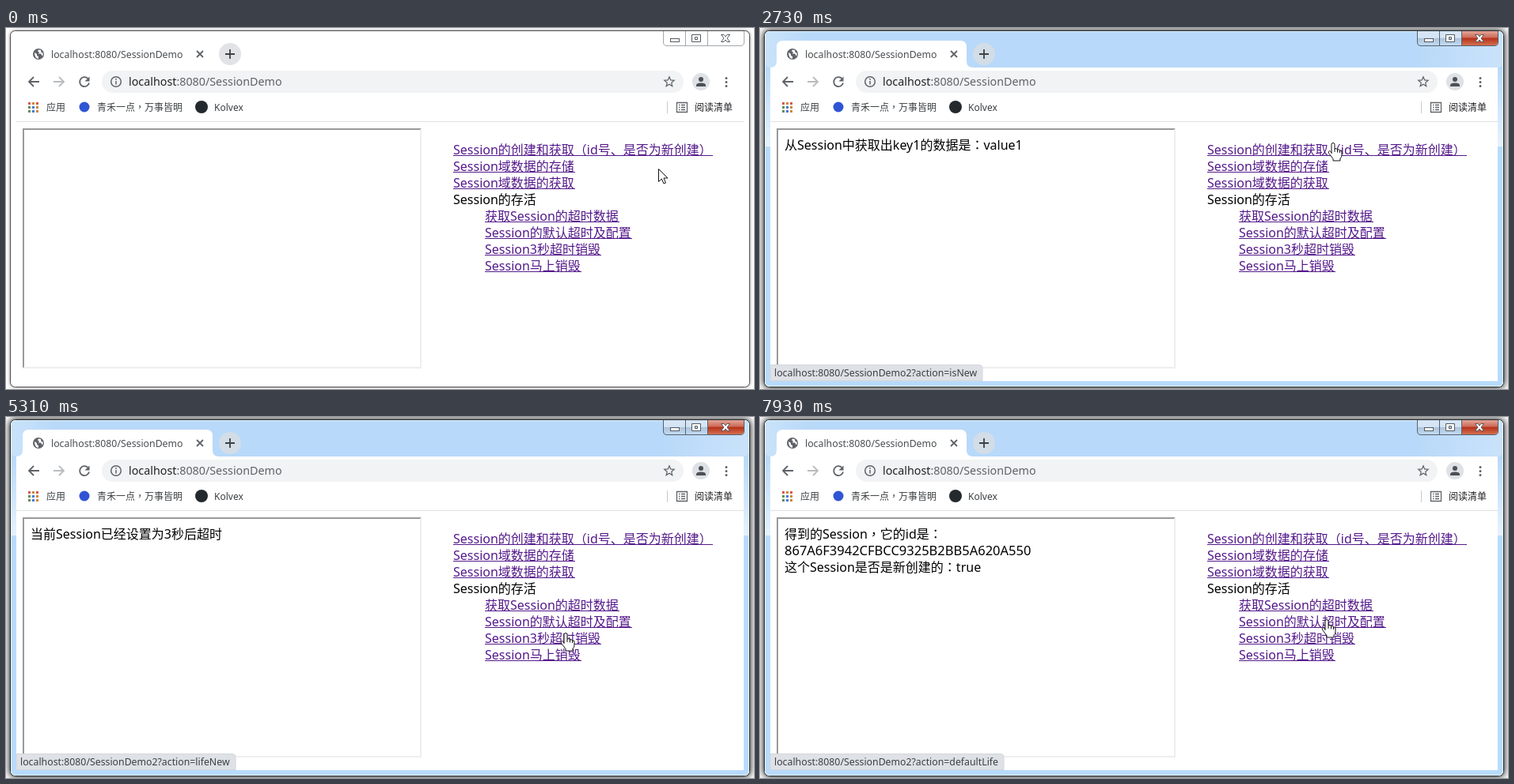
Animation of 945 by 457 pixels, one loop 8000 ms. Source, as an HTML page:

```html
<!DOCTYPE html>
<html lang="zh-CN">
<head>
<meta charset="utf-8">
<title>Session demo</title>
<style>
html, body { margin: 0; width: 100%; height: 100%; overflow: hidden; background: #fff; }
svg { display: block; width: 100%; height: 100%; font: 16px "Noto Sans", "Noto Sans CJK SC", "Noto Sans CJK", sans-serif; }
text { white-space: pre; }
.centred { font-family: "Noto Sans CJK TC", "Noto Sans CJK", sans-serif; }
.small { font-size: 12.300px; fill: #4a4e52; }
#status .small { fill: #3c4043; }
.mark { font-size: 12px; fill: #3c4043; }
.link { fill: #551a8b; }
.link.pressed { fill: #e00; }
.line { fill: none; stroke: #5f6368; stroke-width: 1.8; }
.window { fill: #fff; stroke: #4c4c4c; filter: drop-shadow(0 0 2px #0006); }
.glass, .close { display: none; }
.buttons { fill: #fff; stroke: #a3a7ab; }
.glyph { fill: #fff; stroke: #555b63; }
.plus { fill: #e1e3e6; }
.active .window { stroke: #252a30; filter: drop-shadow(0 0 4px #000b) drop-shadow(0 0 4px #0006); }
.active .glass, .active .close { display: inline; }
.active .buttons { fill: url(#button); stroke: #56626f; }
.active .plus { fill: #d3dde7; }
</style>
</head>
<body>
<svg id="stage" viewBox="0 0 945 457" preserveAspectRatio="none">
  <defs>
    <linearGradient id="side" x2="0" y2="1">
      <stop offset=".1" stop-color="#b8d9f9"/>
      <stop offset=".325" stop-color="#e6f2fe"/>
      <stop offset=".325" stop-color="#b8dbfc"/>
      <stop offset="1" stop-color="#b8dbfc"/>
    </linearGradient>
    <linearGradient id="button" x2="0" y2="1">
      <stop offset=".45" stop-color="#d5e5f5"/>
      <stop offset=".5" stop-color="#adc3da"/>
      <stop offset="1" stop-color="#c2dcf4"/>
    </linearGradient>
    <linearGradient id="red" x2="0" y2="1">
      <stop offset="0" stop-color="#e3a597"/>
      <stop offset=".45" stop-color="#cc6a57"/>
      <stop offset=".5" stop-color="#b5301a"/>
      <stop offset="1" stop-color="#d5704f"/>
    </linearGradient>
    <linearGradient id="shine">
      <stop offset="0" stop-color="#fff" stop-opacity=".25"/>
      <stop offset=".06" stop-color="#fff" stop-opacity="0"/>
      <stop offset=".88" stop-color="#fff" stop-opacity="0"/>
      <stop offset="1" stop-color="#fff" stop-opacity=".25"/>
    </linearGradient>
  </defs>

  <!-- window frame -->
  <rect class="window" x="5.5" y="3.5" width="934" height="451" rx="6"/>
  <rect class="glass" x="6.5" y="4.5" width="932" height="449" rx="5" fill="url(#side)" stroke="#e4f3ff"/>
  <rect class="glass" x="7" y="5" width="931" height="45" rx="5" fill="url(#shine)"/>
  <path class="glass" d="M13 50H932V447H13Z" fill="#fff"/>
  <path class="glass" d="M13 50q8 0 8-8V24q0-8 8-8H253q8 0 8 8V42q0 8 8 8Z" fill="#fff"/>
  <path class="buttons" d="M830.5 4V18q0 4.5 4.5 4.5H928q4.5 0 4.5-4.5V4M858.5 4V22M886.5 4V22"/>
  <path class="close" d="M887 4H932V18q0 4-4 4H887Z" fill="url(#red)"/>
  <g class="glyph">
    <rect x="839.5" y="13.5" width="11" height="4"/>
    <path d="M866.5 8.5H877.5V17.5H866.5ZM870.5 11.5H873.5V14.5H870.5Z" fill-rule="evenodd"/>
    <path d="M903.5 8.5h3.5l2 2.5 2-2.5h3.5l-3.5 4.5 3.5 4.5h-3.5l-2-2.5-2 2.5h-3.5l3.5-4.5Z"/>
  </g>

  <!-- tab -->
  <circle cx="41" cy="33" r="7" fill="#5f6368"/>
  <path d="M36 31l3 2v2l2 1v3q-5-1-5-8M41 27.5l-1 2 2 1-1 2h3l2 3q1-2 .5-4l-2-.5-.5-3Z" fill="#fff"/>
  <text class="small" x="57" y="38">localhost:8080/SessionDemo</text>
  <path class="line" d="M241 29l8 8m0-8l-8 8"/>
  <circle class="plus" cx="283" cy="33" r="14"/>
  <path class="line" d="M277 33H289M283 27V39" style="stroke:#3c4043"/>

  <!-- toolbar -->
  <path class="line" d="M42 68H29M35 62L29 68L35 74"/>
  <path class="line" d="M60 68H73M67 62L73 68L67 74" style="stroke:#b9bcbf"/>
  <path class="line" d="M103.5 64A6 6 0 1 0 105 69.5"/>
  <path d="M105.5 61.5V67.5H99.5Z" fill="#5f6368"/>
  <rect x="121" y="54" width="735" height="28" rx="14" fill="#f1f3f4"/>
  <circle class="line" cx="139" cy="68" r="6.3" style="stroke-width:1.5"/>
  <path class="line" d="M139 67V71.5M139 64V65.7" style="stroke-width:1.5"/>
  <text x="155" y="73" font-size="14.3" fill="#5f6368"><tspan fill="#202124">localhost</tspan>:8080/SessionDemo</text>
  <path class="line" transform="translate(829.7 59.8) scale(.69)" d="M21 9.5l-6.5-.6L12 3 9.5 8.9 3 9.5l5 4.3L6.5 20 12 16.7 17.5 20 16 13.8Z"/>
  <circle cx="878" cy="68" r="11" fill="#dee1e6"/>
  <path d="M872 74v-1.5q0-3 6-3t6 3V74Z" fill="#4d5156"/>
  <circle cx="878" cy="65" r="3" fill="#4d5156"/>
  <path d="M910 63.5h.01M910 68.5h.01M910 73.5h.01" stroke="#5f6368" stroke-width="3" stroke-linecap="round"/>

  <!-- bookmarks -->
  <g id="apps"></g>
  <text class="mark" x="51" y="105">应用</text>
  <circle cx="99" cy="100" r="6.5" fill="#2f55d4"/>
  <text class="mark" x="115" y="105">青禾一点<tspan class="centred" lang="zh-TW">，</tspan>万事皆明</text>
  <circle cx="247" cy="100" r="8" fill="#24292e"/>
  <text class="mark" x="263" y="105">Kolvex</text>
  <path d="M835.5 93V108" stroke="#c6c9cd"/>
  <path class="line" d="M847.5 94.5H860.5V106.5H847.5ZM850 97.5h1.5m1.5 0h5M850 100.5h1.5m1.5 0h5M850 103.5h1.5m1.5 0h5" style="stroke-width:1.3"/>
  <text class="mark" x="870" y="105" style="fill:#202124">阅读清单</text>
  <path d="M13 118.5H932" stroke="#dfe1e4"/>

  <!-- page -->
  <path d="M21 431V127H525L523 129H23V429Z" fill="#9a9a9a"/>
  <path d="M525 127V431H21L23 429H523V129Z" fill="#eee"/>
  <g id="result"></g>
  <g id="menu"></g>
  <g id="status">
    <path fill="#dee1e6" stroke="#d3d6da"/>
    <text class="small" x="18" y="441"></text>
  </g>
  <g id="cursor" fill="#fff" stroke="#111" stroke-linejoin="round">
    <path id="arrow" d="M.5 .5V16.5L4.3 13L7 19L9.5 18L7 12H12Z"/>
    <g id="hand">
      <path d="M-2 13V1.5Q-2-.5 0-.5T2 1.5V7Q4.5 5.5 5.5 8Q8 7 8.5 9Q11 8 11 11V15Q11 18 9 19V22H0V19.5L-5.5 12.5Q-6.5 10-4.5 9.5Q-3.5 9.5-2 12"/>
      <path d="M2 7V11M5.5 8V11.5M8.5 9V12" fill="none"/>
    </g>
  </g>
</svg>
<script>
const LOOP = 8000, STEP = 80, ROW = 21;
const $ = id => document.getElementById(id);

function add(parent, tag, attrs) {
  const node = document.createElementNS("http://www.w3.org/2000/svg", tag);
  for (const name in attrs) node.setAttribute(name, attrs[name]);
  return parent.appendChild(node);
}

// Full-width commas and colons sit in the middle of their cell.
function setText(node, text) {
  node.innerHTML = text.replace(/[：，]/g, '<tspan class="centred" lang="zh-TW">$&</tspan>');
}

// label, x, right edge, action (none for the plain heading)
const rows = [
  ["Session的创建和获取（id号、是否为新创建）", 565, 893, "isNew"],
  ["Session域数据的存储", 565, 719, "setAttribute"],
  ["Session域数据的获取", 565, 719, "getAttribute"],
  ["Session的存活", 565, 671, ""],
  ["获取Session的超时数据", 605, 775, "getMaxInactiveInterval"],
  ["Session的默认超时及配置", 605, 791, "defaultLife"],
  ["Session3秒超时销毁", 605, 752, "lifeNew"],
  ["Session马上销毁", 605, 727, "invalidateNow"]
];

const session = (id, isNew) => ["得到的Session，它的id是：", id, "这个Session是否是新创建的：" + isNew];
const firstId = "FA08B1BB404A132CF19A565FD74AA0C0";
const secondId = "867A6F3942CFBCC9325B2BB5A620A550";

// time, row, resulting lines
const clicks = [
  [640, 0, session(firstId, true)],
  [1280, 1, ["已经往Session中保存了数据"]],
  [2080, 2, ["从Session中获取出key1的数据是：value1"]],
  [3120, 0, session(firstId, false)],
  [4000, 4, ["当前Session的超时时间是：1800"]],
  [5200, 6, ["当前Session已经设置为3秒后超时"]],
  [5840, 4, ["当前Session的超时时间是：3"]],
  [7200, 0, session(secondId, true)]
];

// time, x, y of the pointer tip
const path = [
  [0, 824, 178], [70, 824, 178], [480, 745, 153], [880, 742, 153],
  [1040, 712, 168], [1300, 711, 170], [1600, 709, 190], [2560, 711, 191],
  [2720, 724, 146], [2900, 722, 137], [3100, 718, 150], [3360, 713, 158],
  [3760, 706, 239], [4000, 706, 240], [4240, 707, 250], [4960, 707, 274],
  [5280, 707, 274], [5700, 706, 236], [6100, 706, 236], [6720, 709, 156],
  [6880, 709, 154], [7200, 709, 154], [7600, 708, 230], [7920, 716, 257],
  [LOOP, 716, 257]
];

const appColors = ["#d9574a", "#c98a3c", "#d9574a", "#5f8f57", "#4b7bd0", "#c98a3c", "#5f8f57", "#4b7bd0", "#c98a3c"];
appColors.forEach((fill, i) => add($("apps"), "rect",
  { x: 28 + i % 3 * 5, y: 94 + Math.floor(i / 3) * 5, width: 3, height: 3, fill }));

const items = rows.map(([label, x, right, action], i) => {
  const item = add($("menu"), "g", { class: action ? "link" : "" });
  setText(add(item, "text", { x, y: 160 + i * ROW }), label);
  if (action) add(item, "rect", { x, y: 161 + i * ROW, width: right - x, height: 1 });
  return item;
});
const lines = [16, 16.5, 16].map((size, i) =>
  add($("result"), "text", { x: 31, y: 154 + i * ROW, "font-size": size }));

function pointerAt(time) {
  const next = Math.max(1, path.findIndex(key => key[0] >= time));
  const [t0, x0, y0] = path[next - 1], [t1, x1, y1] = path[next];
  const p = (time - t0) / (t1 - t0), eased = p * p * (3 - 2 * p);
  return [Math.round(x0 + (x1 - x0) * eased), Math.round(y0 + (y1 - y0) * eased)];
}

function hoveredRow(x, y) {
  const row = rows[Math.max(0, Math.floor((y - 144) / ROW))];
  return y >= 135 && row && row[3] && x >= row[1] && x < row[2] ? row : null;
}

function showStatus(row) {
  const status = $("status"), [bubble, text] = status.children;
  status.style.display = row ? "" : "none";
  if (!row) return;
  text.textContent = "localhost:8080/SessionDemo2?action=" + row[3];
  const right = Math.round(25 + text.getComputedTextLength());
  bubble.setAttribute("d", `M13 426.5H${right - 4}q4 0 4 4V446.5H13Z`);
}

function draw(time) {
  const held = Math.floor(time / STEP) * STEP;
  const [x, y] = pointerAt(held);
  const row = hoveredRow(x, y);
  $("cursor").setAttribute("transform", `translate(${x} ${y})`);
  $("hand").style.display = row ? "" : "none";
  $("arrow").style.display = row ? "none" : "";
  showStatus(row);

  $("stage").classList.toggle("active", held >= clicks[0][0] - STEP);
  const done = clicks.filter(click => held >= click[0]).pop();
  lines.forEach((line, i) => setText(line, done && done[2][i] || ""));
  const press = clicks.find(([at]) => held < at && held >= at - STEP);
  items.forEach((item, i) => item.classList.toggle("pressed", !!press && press[1] === i));
}

const start = performance.now();
function tick() {
  draw((performance.now() - start) % LOOP);
  requestAnimationFrame(tick);
}
tick();
</script>
</body>
</html>
```
